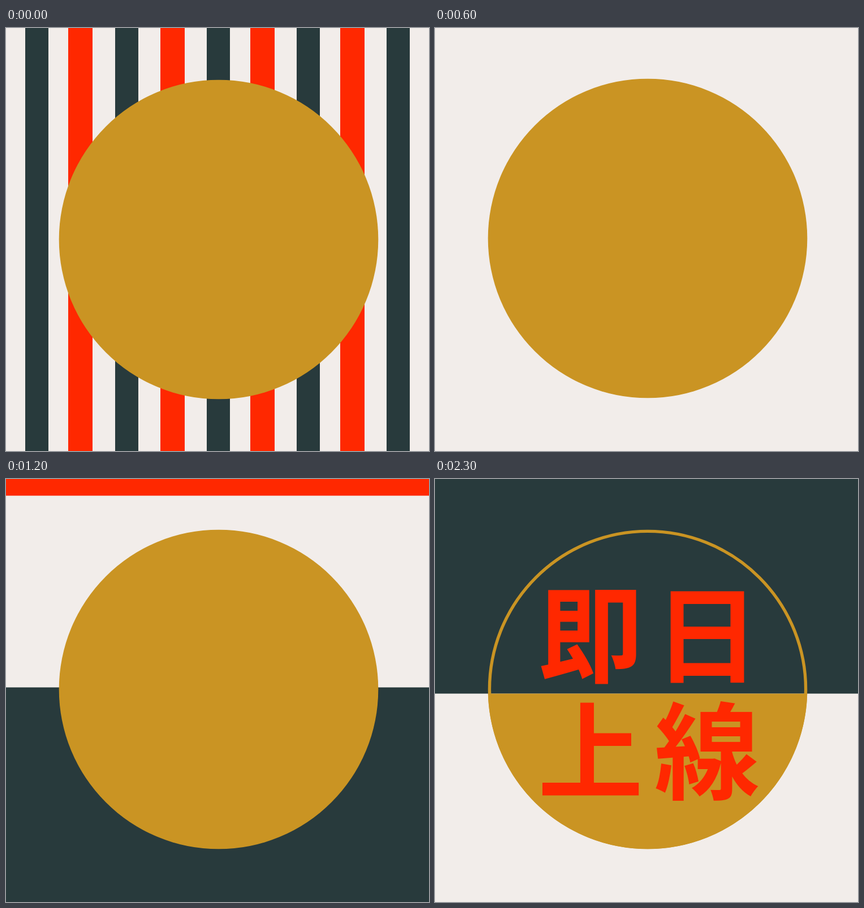
Write an HTML page that moves like this. It is 748 px wide and 748 px high and loops after 2.8 s.

```html
<!DOCTYPE html>
<html lang="ja">
<head>
<meta charset="utf-8">
<title>即日上線</title>
<style>
  html, body { margin: 0; width: 100%; height: 100%; overflow: hidden; background: #f2edea; }
  svg { display: block; width: 100%; height: 100%; }
  text {
    font: 700 186px "Noto Sans CJK JP", "Noto Sans CJK", sans-serif;
    text-anchor: middle;
    fill: #ff2800;
  }
</style>
</head>
<body>
<svg id="stage" viewBox="0 0 748 748"></svg>
<script>
const SIZE = 748, LOOP = 2800;
const CREAM = '#f2edea', DARK = '#283a3c', RED = '#ff2800', GOLD = '#ca9423';
const stage = document.getElementById('stage');

const rect = (x, y, w, h, fill) =>
  w > 0 && h > 0 ? `<rect x="${x}" y="${y}" width="${w}" height="${h}" fill="${fill}"/>` : '';
const column = (x, w, fill) => rect(x, 0, w, SIZE, fill);
const row = (y, h, fill) => rect(0, y, SIZE, h, fill);
const disc = (cx = 376, cy = 372) => `<circle cx="${cx}" cy="${cy}" r="282.3" fill="${GOLD}"/>`;
const ring = (cx, cy) =>
  `<circle cx="${cx}" cy="${cy}" r="279.6" fill="none" stroke="${GOLD}" stroke-width="5.4"/>`;

// Half disc as a circular segment cut at height y
function halfDisc(cx, cy, y, upper) {
  const r = 282.3, dx = Math.sqrt(r * r - (y - cy) ** 2);
  return `<path d="M${cx - dx} ${y}A${r} ${r} 0 0 ${upper ? 1 : 0} ${cx + dx} ${y}Z" fill="${GOLD}"/>`;
}

// Four characters in a two by two grid
const words = (chars, x, y) => [...chars].map((c, i) =>
  `<text x="${x + 206 * (i % 2)}" y="${y + 205.5 * (i >> 1)}">${c}</text>`).join('');

const darkBars = [34, 193, 355, 514, 673];
const redBars = [110, 273, 432, 591];

// Bars part from the middle, one step every 100 ms
function bars(step) {
  const top = 374 - 72 * step, bottom = 374 + 74.75 * step;
  const split = (x, w, fill) => step === 0
    ? column(x, w, fill)
    : rect(x, 0, w, top, fill) + rect(x, bottom, w, SIZE - bottom, fill);
  return darkBars.map(x => split(x, 41, DARK)).join('') +
    redBars.map(x => split(x, 43, RED)).join('') +
    disc(376, step === 0 ? 374 : 372);
}

const scenes = [
  [900, t => bars(Math.min(6, Math.floor(t / 100)))],
  [1200, () => column(0, 379.5, DARK) + column(718, 30, RED) + disc()],
  [1500, () => row(0, 29.5, RED) + row(368.5, 379.5, DARK) + disc()],
  [1800, () => disc() + column(353.5, 30, RED) + column(383.5, 364.5, DARK)],
  [2300, () => row(368.5, 379.5, DARK) + halfDisc(372.3, 375.7, 368.5, true) +
    ring(372.3, 375.7) + words('隔日作廢', 267.7, 341.5)],
  [LOOP, () => row(0, 379.5, DARK) + halfDisc(376, 372, 379.5, false) +
    ring(376, 372) + words('即日上線', 275, 346)]
];

let shown = '';
function draw(t) {
  const markup = row(0, SIZE, CREAM) + scenes.find(([end]) => t < end)[1](t);
  if (markup !== shown) stage.innerHTML = shown = markup;
}

const start = performance.now();
function tick() {
  draw((performance.now() - start) % LOOP);
  requestAnimationFrame(tick);
}
tick();
</script>
</body>
</html>
```
